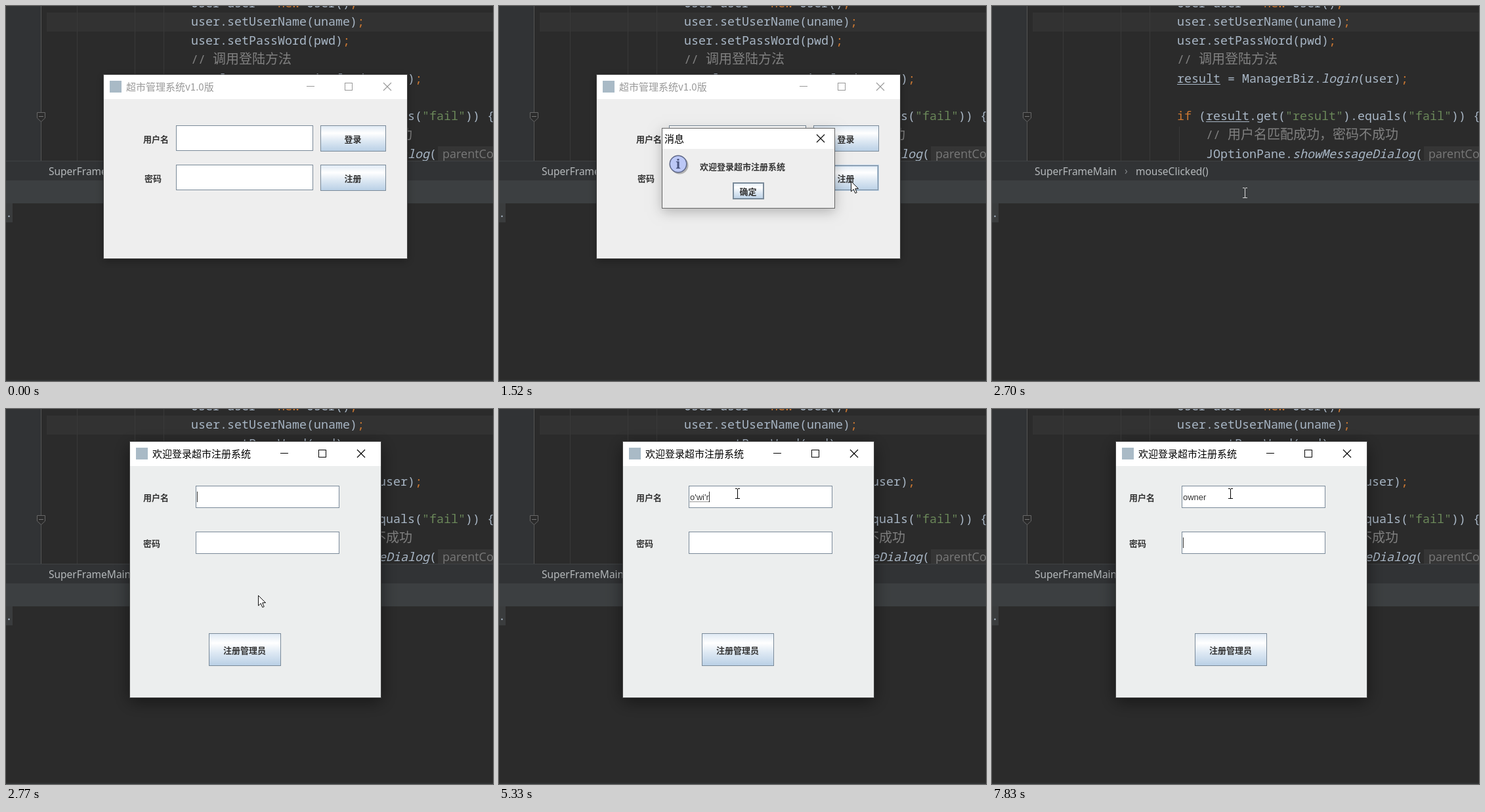
These frames come from a looping animation (742x572 px, 8000 ms). An HTML page with a canvas:

```html
<!DOCTYPE html>
<html lang="zh-CN">
<head>
<meta charset="utf-8">
<style>
html, body { margin: 0; width: 100%; height: 100%; overflow: hidden; background: #2b2b2b; }
canvas { display: block; width: 742px; height: 572px; }
</style>
</head>
<body>
<canvas id="stage" width="742" height="572"></canvas>
<script>
const ctx = document.getElementById('stage').getContext('2d');
const LOOP = 8000;
const CJK = '"Noto Sans CJK SC", "Noto Sans CJK", sans-serif';
const MONO = '18.33px "Noto Sans Mono", "Noto Sans CJK SC", monospace';
const UI = '15px ' + CJK;
const BOLD = 'bold 13px ' + CJK;
const INPUT = '13px "Liberation Sans", sans-serif';
const COLORS = { d: '#a9b7c6', k: '#cc7832', s: '#6a8759', c: '#808080' };
const COLUMN = 11;

function rect(x, y, w, h, fill) {
  ctx.fillStyle = fill;
  ctx.fillRect(x, y, w, h);
}

function frame(x, y, w, h, color, width = 1) {
  ctx.strokeStyle = color;
  ctx.lineWidth = width;
  ctx.strokeRect(x + width / 2, y + width / 2, w - width, h - width);
}

function text(str, x, y, font, fill) {
  ctx.font = font;
  ctx.fillStyle = fill;
  ctx.fillText(str, x, y);
}

function line(x1, y1, x2, y2, color, width = 1) {
  ctx.beginPath();
  ctx.moveTo(x1, y1);
  ctx.lineTo(x2, y2);
  ctx.strokeStyle = color;
  ctx.lineWidth = width;
  ctx.stroke();
}

function polygon(points, fill, stroke) {
  ctx.beginPath();
  points.forEach(([x, y]) => ctx.lineTo(x, y));
  ctx.closePath();
  ctx.fillStyle = fill;
  ctx.fill();
  ctx.strokeStyle = stroke;
  ctx.lineWidth = 1;
  ctx.stroke();
}

function disc(x, y, r, fill) {
  ctx.beginPath();
  ctx.arc(x, y, r, 0, Math.PI * 2);
  ctx.fillStyle = fill;
  ctx.fill();
}

const baseline = row => Math.ceil(30 + row * 28.8);

// Each part is [kind, text]; kind "I" is italic, "u" is underlined.
function code(x, row, parts) {
  const y = baseline(row);
  for (const [kind, str] of parts) {
    text(str, x, y, (kind === 'I' ? 'italic ' : '') + MONO, COLORS[kind] || COLORS.d);
    const width = str.length * COLUMN;
    if (kind === 'u') rect(x, y + 2, width, 1, COLORS.d);
    x += width;
  }
}

function comment(x, row, str) {
  const y = baseline(row);
  text('//', x, y, MONO, COLORS.c);
  text(str, x + 33, y, '20px ' + CJK, COLORS.c);
}

function editor() {
  rect(0, 0, 742, 572, '#2b2b2b');
  rect(0, 0, 53, 237, '#313335');
  rect(62, 10, 680, 29, '#323232');
  rect(53, 0, 1, 237, '#555555');
  for (const x of [108, 196, 240]) rect(x, 0, 1, 237, '#393939');
  rect(285, 184, 1, 53, '#393939');

  polygon([[47.5, 162.5], [59.5, 162.5], [59.5, 171], [53.5, 176.5], [47.5, 171]],
    '#2b2b2b', '#686868');
  rect(50, 168, 7, 1, '#777777');

  code(282, -1, [['d', 'User user = '], ['k', 'new '], ['d', 'User()'], ['k', ';']]);
  code(282, 0, [['d', 'user.setUserName(uname)'], ['k', ';']]);
  code(282, 1, [['d', 'user.setPassWord(pwd)'], ['k', ';']]);
  comment(282, 2, '调用登陆方法');
  code(282, 3, [['u', 'result'], ['d', ' = ManagerBiz.'], ['I', 'login'], ['d', '(user)'], ['k', ';']]);
  code(282, 5, [['k', 'if '], ['d', '('], ['u', 'result'], ['d', '.get('], ['s', '"result"'],
    ['d', ').equals('], ['s', '"fail"'], ['d', ')) {']]);
  comment(326, 6, '用户名匹配成功，密码不成功');
  code(326, 7, [['d', 'JOptionPane.'], ['I', 'showMessageDialog'], ['d', '(']]);
  rect(658, 214, 84, 23, '#353535');
  text('parentComponent:', 665, 232, '18px "Open Sans", sans-serif', '#787878');

  rect(0, 236, 742, 31, '#313335');
  rect(0, 236, 742, 1, '#3f4244');
  const crumb = '15.5px "Noto Sans", sans-serif';
  text('SuperFrameMain', 65, 258, crumb, '#b4b8ba');
  text('›', 202, 257, crumb, '#85898b');
  text('mouseClicked()', 219, 258, crumb, '#b4b8ba');
  rect(0, 266, 742, 35, '#3c3f41');
  rect(0, 301, 10, 29, '#3a3c3d');
  text('.', -1, 322, MONO, '#a9b7c6');
  rect(0, 570, 742, 2, '#303233');
}

function shadowBox(x, y, w, h, fill, blur, alpha) {
  ctx.save();
  ctx.shadowColor = `rgba(0,0,0,${alpha})`;
  ctx.shadowBlur = blur;
  ctx.shadowOffsetY = blur / 4;
  rect(x, y, w, h, fill);
  ctx.restore();
}

function cross(x, y, color) {
  line(x - 6, y - 6, x + 6, y + 6, color, 1.1);
  line(x - 6, y + 6, x + 6, y - 6, color, 1.1);
}

function appWindow(x, y, w, h, title, active, body) {
  const ink = active ? '#000000' : '#999999';
  shadowBox(x, y, w, h, body, active ? 24 : 12, active ? 0.5 : 0.35);
  rect(x, y, w, 37, '#ffffff');
  frame(x - 1, y - 1, w + 2, h + 2, '#454545');
  rect(x + 9, y + 9, 18, 18, '#a9bac6');
  text(title, x + 34, y + 24, UI, ink);
  const right = x + w;
  rect(right - 153, y + 17, 12, 1, ink);
  frame(right - 95, y + 12, 12, 12, ink);
  cross(right - 30, y + 18, ink);
}

function field(x, y, w, h) {
  rect(x, y, w, h, '#ffffff');
  frame(x, y, w, h, '#7a8a99');
}

function button(x, y, w, h, label, { hover = false, pressed = false, thick = 1 } = {}) {
  const fill = ctx.createLinearGradient(0, y, 0, y + h);
  fill.addColorStop(0, '#dde8f3');
  fill.addColorStop(0.3, '#ffffff');
  fill.addColorStop(0.6, '#dde8f3');
  fill.addColorStop(1, '#b8cfe5');
  rect(x, y, w, h, pressed ? '#b8cfe5' : fill);
  if (hover) {
    frame(x, y, w, h, '#b8cfe5', 3);
    frame(x + 1, y + 1, w - 2, h - 2, '#7a8a99');
  } else {
    frame(x, y, w, h, '#7a8a99', thick);
  }
  ctx.textAlign = 'center';
  text(label, x + w / 2 - 0.5, y + h / 2 + 6, BOLD, '#333333');
  ctx.textAlign = 'left';
}

function loginWindow(t) {
  appWindow(149, 105, 462, 280, '超市管理系统v1.0版', t >= 1220 && t < 1520, '#eeeeee');
  text('用户名', 209, 208, BOLD, '#333333');
  text('密码', 211, 268, BOLD, '#333333');
  field(259, 182, 209, 39);
  field(259, 242, 209, 39);
  button(479, 182, 100, 40, '登录');
  button(479, 242, 100, 40, '注册', { hover: t >= 830, pressed: t >= 1220 && t < 1380 });
}

function messageDialog(t) {
  shadowBox(248, 186, 264, 123, '#eeeeee', 18, 0.25);
  rect(248, 186, 264, 32, '#ffffff');
  frame(248, 186, 264, 123, '#666666');
  text('消息', 252, 208, UI, '#000000');
  cross(490, 202, '#000000');
  disc(275, 243, 13.5, 'rgba(0,0,0,0.25)');
  disc(273, 241, 13.5, '#5c6688');
  disc(273, 241, 12, '#bcc8f6');
  ctx.textAlign = 'center';
  text('i', 273, 248, 'bold 20px "Noto Serif", serif', '#4a5580');
  ctx.textAlign = 'left';
  text('欢迎登录超市注册系统', 306, 250, BOLD, '#333333');
  button(356, 269, 48, 26, '确定', { thick: 2, pressed: t >= 2455 });
}

// [start, value]: the last entry that has started is in force.
const TYPED = [[0, ''], [4790, 'o'], [4930, "o'w"], [5330, "o'wi'r"], [6030, "o'wi"],
  [6270, "o'w"], [6810, 'ow'], [7210, 'own'], [7370, 'owne'], [7530, 'owner']];
const CARET = [[2770, true], [3270, false], [3770, true], [4310, false], [4790, true],
  [5860, false], [6030, true]];

function current(track, t) {
  return track.reduce((value, [start, next]) => t >= start ? next : value, track[0][1]);
}

function registerWindow(t) {
  appWindow(189, 50, 382, 390, '欢迎登录超市注册系统', true, '#eceeee');
  text('用户名', 209, 140, BOLD, '#333333');
  text('密码', 209, 210, BOLD, '#333333');
  field(289, 117, 219, 34);
  field(289, 187, 219, 34);
  button(309, 342, 110, 50, '注册管理员');

  const typed = current(TYPED, t);
  text(typed, 291, 139, INPUT, '#333333');
  const width = Math.round(ctx.measureText(typed).width);
  if (t >= 4790 && t < 6810) {
    for (let x = 0; x < width; x += 2) rect(291 + x, 141, 1, 1, '#333333');
  }
  if (t >= 7830) rect(291, 196, 1, 16, '#333333');
  else if (current(CARET, t)) rect(291 + width, 126, 1, 16, '#333333');
}

// Pointer moves: start, end, step count, start point, bend, end point.
const MOVES = [
  [290, 450, 3, [635, 580], [604, 495], [568, 410]],
  [590, 990, 6, [568, 410], [561, 330], [536, 267]],
  [1840, 2230, 6, [536, 267], [460, 276], [390, 284]],
  [2370, 2540, 3, [390, 284], [387, 284], [384, 284]],
  [3240, 3860, 9, [384, 284], [392, 210], [363, 129]]
];

function pointer(t) {
  const move = MOVES.filter(m => t >= m[0]).pop();
  if (!move) return null;
  const [start, end, steps, a, b, c] = move;
  const step = Math.floor((t - start) / (end - start) * (steps - 1) + 1e-6) + 1;
  const p = Math.min(1, step / steps);
  const ease = p * (2 - p) * 0.4 + p * 0.6;
  return a.map((v, i) =>
    Math.round((1 - ease) ** 2 * v + 2 * ease * (1 - ease) * b[i] + ease ** 2 * c[i]));
}

function iBeam(x, y, color) {
  rect(x, y - 7, 1, 15, color);
  for (const edge of [y - 8, y + 7]) {
    rect(x - 3, edge, 3, 1, color);
    rect(x + 1, edge, 3, 1, color);
  }
}

function arrow(x, y) {
  ctx.save();
  ctx.translate(x + 0.5, y + 0.5);
  polygon([[0, 0], [0, 15.5], [3.7, 12], [6.3, 18], [8.7, 17], [6.2, 11.2], [11, 11]],
    '#ffffff', '#111111');
  ctx.restore();
}

const CLICKS = [[1220, 1380], [2455, 2700], [4010, 4090]];

function cursor(t) {
  const at = pointer(t);
  if (!at) return;
  const [x, y] = at;
  if (CLICKS.some(([from, to]) => t >= from && t < to)) {
    disc(x - 1, y - 1, 14.5, 'rgba(232,240,40,0.65)');
  }
  const inField = t >= 3240 && x >= 289 && x < 508 && y >= 117 && y < 221 && (y < 151 || y >= 187);
  const onDesktop = t < 2700 ? y > 385 : t < 2770;
  if (onDesktop) iBeam(x + 1, y + 1, '#d8d8d8');
  else if (inField) iBeam(x, y, '#000000');
  else arrow(x, y);
}

function draw(t) {
  editor();
  if (t < 2700) loginWindow(t);
  if (t >= 1520 && t < 2700) messageDialog(t);
  if (t >= 2770) registerWindow(t);
  cursor(t);
}

const origin = performance.now();
function tick() {
  draw((performance.now() - origin) % LOOP);
  requestAnimationFrame(tick);
}
tick();
</script>
</body>
</html>
```
